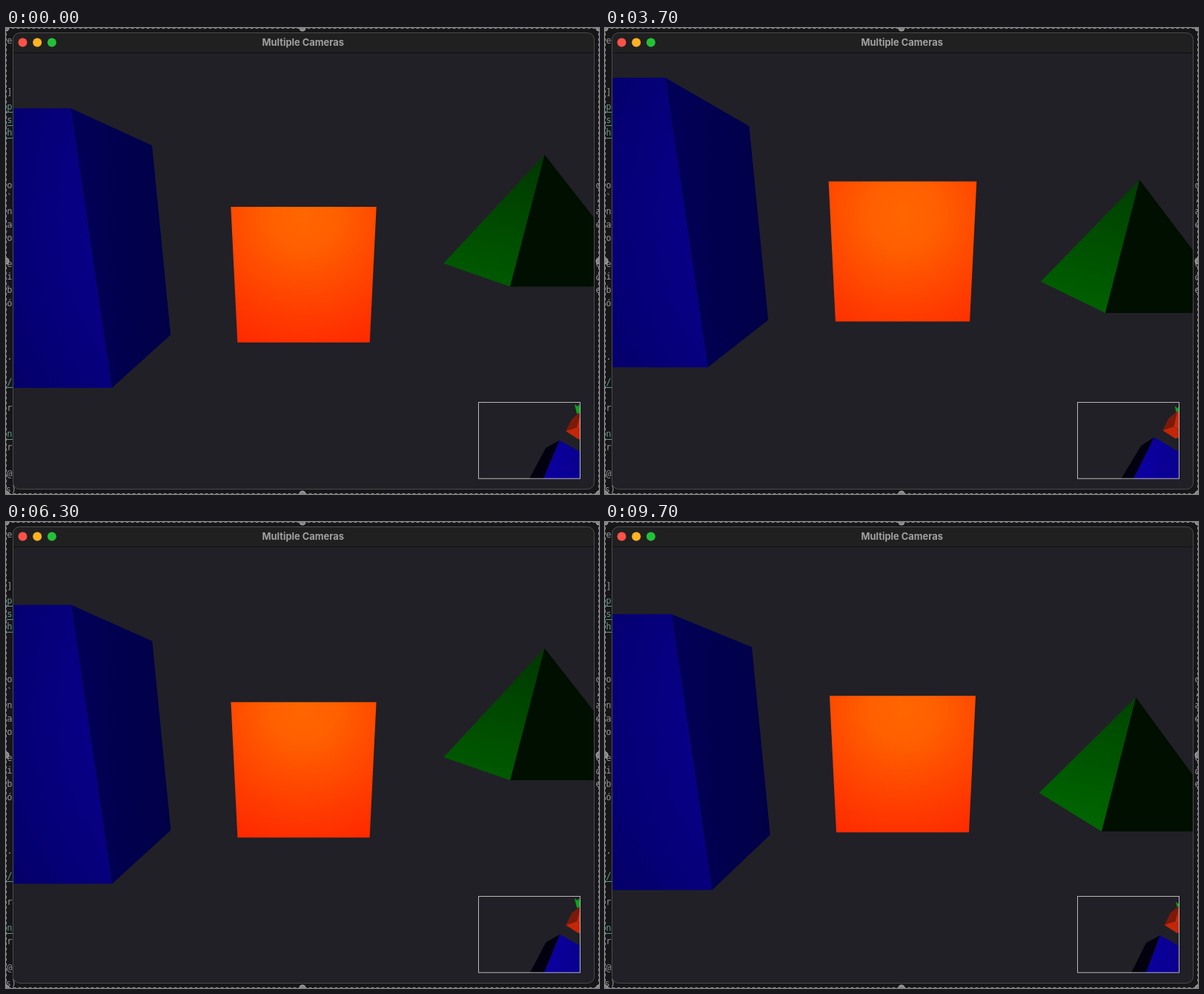
These frames come from a looping animation (800x628 px, 9800 ms). An HTML page with a canvas:

```html
<!DOCTYPE html>
<html lang="en">
<head>
<meta charset="utf-8">
<title>Multiple Cameras</title>
<style>
html, body { margin: 0; width: 100%; height: 100%; overflow: hidden; background: #161618; }
canvas { display: block; }
</style>
</head>
<body>
<canvas id="stage" width="800" height="628"></canvas>
<script>
const ctx = document.getElementById('stage').getContext('2d');
const LOOP = 9800, STEP = 100;
const VIEW = { x: 9, y: 34, w: 785, h: 587, cx: 401.5, cy: 328 };
const EYE = { y: 0.5, z: 2.5 }, TILT = 0.2, FOCAL = 383;
const BACKDROP = '#212026';

// Perspective camera at EYE, aimed at the world centre.
function project([x, y, z]) {
  const norm = Math.hypot(1, TILT);
  const up = y - EYE.y, ahead = EYE.z - z;
  const depth = (ahead - TILT * up) / norm;
  const rise = (up + TILT * ahead) / norm;
  return [VIEW.cx + FOCAL * x / depth, VIEW.cy - FOCAL * rise / depth];
}

function poly(points, fill) {
  ctx.beginPath();
  points.forEach(([x, y]) => ctx.lineTo(x, y));
  ctx.closePath();
  ctx.fillStyle = fill;
  ctx.fill();
}

const face = (points, fill) => poly(points.map(project), fill);
const shift = (points, dx, dy) => points.map(([x, y]) => [x + dx, y + dy]);
const bounce = (t, speed, phase) => 0.5 * Math.abs(Math.sin(speed * t + phase));

function disc(x, y, r, fill) {
  ctx.beginPath();
  ctx.arc(x, y, r, 0, Math.PI * 2);
  ctx.fillStyle = fill;
  ctx.fill();
}

function shade(gradient, colors) {
  colors.forEach((c, i) => gradient.addColorStop(i / (colors.length - 1), c));
  return gradient;
}

const paint = {
  orange: shade(ctx.createRadialGradient(402, 251, 0, 402, 251, 190),
    ['#ff6600', '#ff5f00', '#ff4c00', '#ff3a00', '#ff2a00']),
  blueFront: shade(ctx.createRadialGradient(402, 251, 280, 402, 251, 460), ['#080088', '#040068']),
  blueSide: shade(ctx.createLinearGradient(85, 0, 222, 0), ['#010058', '#010046']),
  green: shade(ctx.createLinearGradient(705, 160, 645, 430), ['#003600', '#006a00']),
  insetBlue: shade(ctx.createLinearGradient(715, 0, 775, 0), ['#0c00a4', '#09008e'])
};

function drawMain(red, blue, green) {
  const frontBox = (x0, x1, y0, y1) => [[x0, y1, 0.5], [x1, y1, 0.5], [x1, y0, 0.5], [x0, y0, 0.5]];
  face(frontBox(-2.5, -1.5, blue - 1, blue + 1), paint.blueFront);
  face([[-1.5, blue + 1, 0.5], [-1.5, blue + 1, -0.5], [-1.5, blue - 1, -0.5], [-1.5, blue - 1, 0.5]],
    paint.blueSide);
  face(frontBox(-0.5, 0.5, red - 0.5, red + 0.5), paint.orange);
  const apex = [2, green + 0.5, 0], base = green - 0.5;
  face([apex, [1.5, base, -0.5], [1.5, base, 0.5]], paint.green);
  face([apex, [1.5, base, 0.5], [2.5, base, 0.5]], '#000f00');
}

function drawInset(red, blue, green) {
  ctx.save();
  ctx.beginPath();
  ctx.rect(637, 504, 138, 104);
  ctx.clip();
  ctx.fillStyle = BACKDROP;
  ctx.fillRect(637, 504, 138, 104);

  const dg = 0.485 - green;
  poly(shift([[767, 507], [771, 510], [773, 507], [777, 524], [774, 523], [770, 519]], dg * 8, dg * 12), '#0fa31f');

  const dr = 0.416 - red;
  const cube = (points, fill) => poly(shift(points, dr * 17, dr * 6), fill);
  cube([[749, 541], [757, 525], [769, 515], [764, 536]], '#7c1a09');
  cube([[764, 536], [769, 515], [784, 533], [784, 552]], '#cc2a08');
  cube([[749, 541], [764, 536], [780, 549], [766, 552]], '#c42607');

  const k = (0.497 - blue) / 0.394;
  const top = [736 + 13 * k, 548 + 9 * k], back = [719 + 11 * k, 560.5 + 6.5 * k];
  const foot = [702.5 + 27 * k, 608];
  poly([back, top, foot, [687.5 + 22 * k, 608]], '#030010');
  poly([top, [776, 572], [776, 608], foot], paint.insetBlue);
  ctx.restore();
  ctx.strokeStyle = '#b8b8b8';
  ctx.lineWidth = 1;
  ctx.strokeRect(637.5, 504.5, 137, 102.7);
}

const LEFT_TEXT = [[18, 'e'], [88, ']'], [107, 'p', 1], [125, 's', 1], [142, 'h', 1], [213, 'o'], [230, '`'],
  [248, 'n'], [266, 'a'], [284, 'o'], [319, 'e'], [336, 'i'], [354, 'b'], [372, 'ó'], [444, '.'],
  [478, '/', 1], [513, 'er'], [548, 'n', 1], [566, 'ar'], [602, '@'], [623, 's)']];
const RIGHT_TEXT = [[213, 'o'], [230, ','], [248, 'a'], [266, 'e'], [319, 'C'], [337, 'ó'], [354, 'e']];

function drawDesktop(t) {
  ctx.fillStyle = '#161618';
  ctx.fillRect(0, 0, 800, 628);
  ctx.font = '12px "DejaVu Sans Mono", monospace';
  ctx.textBaseline = 'middle';
  ctx.textAlign = 'right';
  for (const [y, text, link] of LEFT_TEXT) {
    const short = t > 8.5 && (text === 'er' || text === 'ar');
    ctx.fillStyle = link ? '#5f9a8c' : '#96969a';
    ctx.fillText(short ? 'r' : text, y > 620 ? 14 : 8.5, y);
    if (link) ctx.fillRect(1, y + 6, 8, 1);
  }
  ctx.textAlign = 'left';
  ctx.fillStyle = '#96969a';
  RIGHT_TEXT.forEach(([y, text]) => ctx.fillText(text, 795.5, y));
}

function drawSelection() {
  ctx.strokeStyle = '#8c8c8c';
  ctx.lineWidth = 1;
  ctx.setLineDash([4, 3]);
  ctx.strokeRect(0.5, 0.5, 799, 627);
  ctx.setLineDash([]);
  for (const [x, y] of [[400, 0], [400, 628], [0, 314], [800, 314], [0, 0], [800, 0], [0, 628], [800, 628]]) {
    disc(x, y, 4.5, '#a2a2a2');
    disc(x, y, 3.3, '#858585');
  }
}

function drawWindow(scene) {
  ctx.save();
  ctx.beginPath();
  ctx.roundRect(9, 6.5, 785, 615, 9);
  ctx.clip();
  ctx.fillStyle = BACKDROP;
  ctx.fillRect(9, 6, 785, 616);
  ctx.save();
  ctx.beginPath();
  ctx.rect(VIEW.x, VIEW.y, VIEW.w, VIEW.h);
  ctx.clip();
  drawMain(...scene);
  ctx.restore();
  ctx.fillStyle = '#202021';
  ctx.fillRect(9, 6, 785, 28);
  ctx.fillStyle = '#111113';
  ctx.fillRect(9, 33, 785, 1);
  drawInset(...scene);
  ctx.restore();

  ctx.beginPath();
  ctx.roundRect(9.5, 6.5, 784, 615, 9);
  ctx.strokeStyle = '#4b4b4d';
  ctx.lineWidth = 1;
  ctx.stroke();
  ['#ff5148', '#ffb224', '#23c137'].forEach((c, i) => disc(22.5 + 19.7 * i, 19.5, 6, c));
  ctx.font = '700 12.9px Inter, sans-serif';
  ctx.textAlign = 'center';
  ctx.textBaseline = 'alphabetic';
  ctx.fillStyle = '#a0a0a2';
  ctx.fillText('Multiple Cameras', 400.8, 23.5);
}

function render(now) {
  const t = Math.floor((now % LOOP) / STEP) * STEP / 1000;
  const scene = [bounce(t, 1, -0.104), bounce(t, 2, -0.349), bounce(t, 1.5, 1.344)];
  drawDesktop(t);
  drawWindow(scene);
  drawSelection();
}

const start = performance.now();
function tick() {
  render(performance.now() - start);
  requestAnimationFrame(tick);
}
tick();
</script>
</body>
</html>
```
